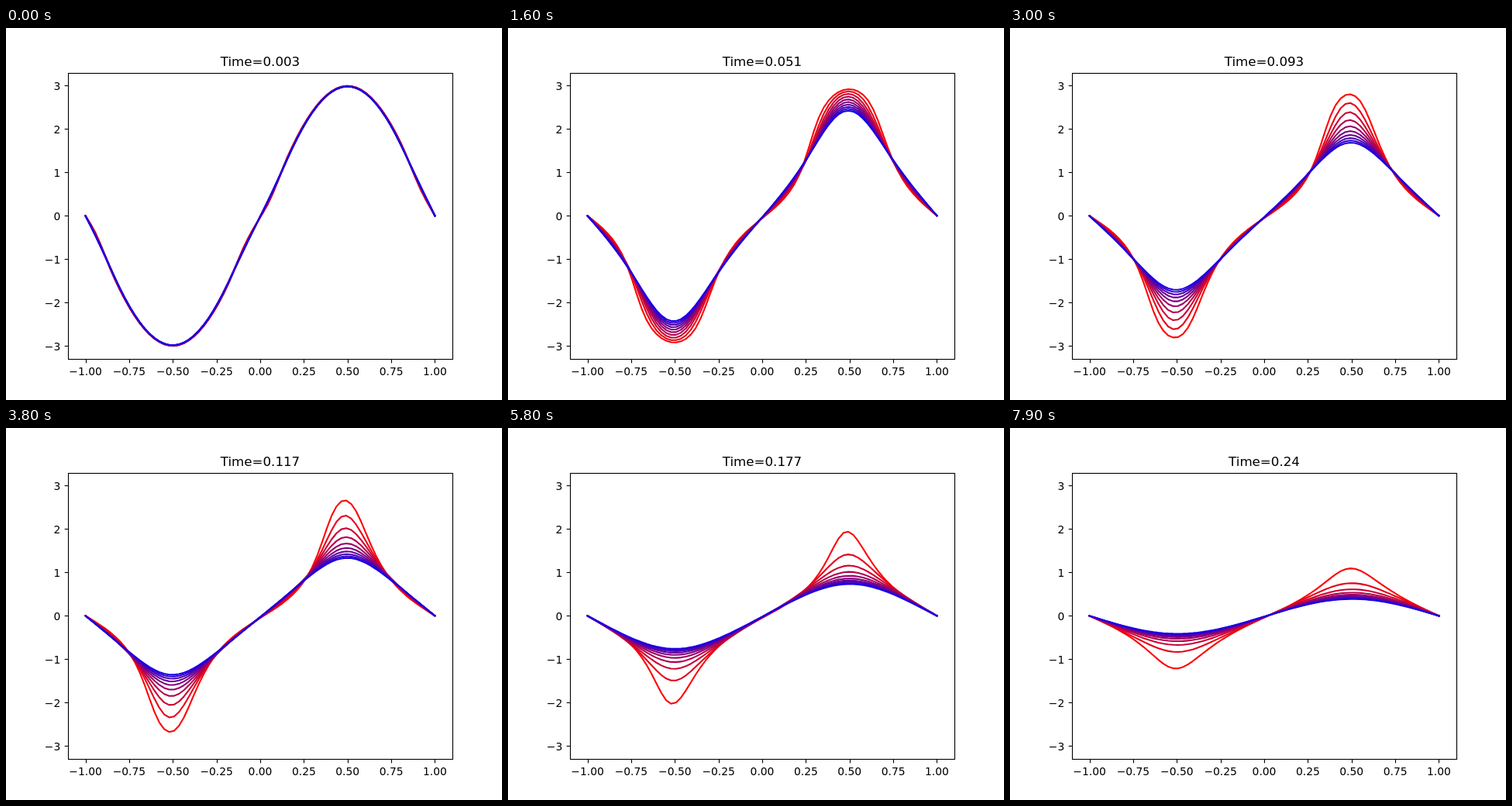
Animation, 640 px wide and 480 px high, one loop 8 s. Source, as an HTML page with a canvas:

```html
<!DOCTYPE html>
<html lang="en">
<head>
<meta charset="utf-8">
<title>Nonlinear diffusion</title>
<style>
  html, body { margin: 0; width: 100%; height: 100%; overflow: hidden; background: #fff; }
  canvas { display: block; }
</style>
</head>
<body>
<canvas id="plot" width="640" height="480"></canvas>
<script>
const ctx = document.getElementById('plot').getContext('2d');
const FRAMES = 80, FRAME_MS = 100, DT = 0.003;
const CURVES = 10, CELLS = 71, SUBSTEPS = 10;
const LEFT = 80, RIGHT = 576, TOP = 57.6, BOTTOM = 427.2;

const px = x => 328 + x * (RIGHT - LEFT) / 2.2;
const py = y => 242.4 - y * (BOTTOM - TOP) / 6.6;
const snap = v => Math.floor(v + 0.5) + 0.5;

// u_t = (D(u) u_x)_x with D = 1 / (1 + u^2 / s), u = 0 at both ends
function solve(s) {
  const h = 2 / CELLS, r = DT / SUBSTEPS / (h * h);
  const u = Array.from({ length: CELLS + 1 }, (_, i) => 3 * Math.sin(Math.PI * (i * h - 1)));
  u[0] = u[CELLS] = 0;
  const flux = new Float64Array(CELLS);
  const states = [];
  for (let n = 0; n < FRAMES; n++) {
    for (let k = 0; k < SUBSTEPS; k++) {
      for (let i = 0; i < CELLS; i++) {
        flux[i] = (u[i + 1] - u[i]) / (1 + u[i + 1] ** 2 / s);
      }
      for (let i = 1; i < CELLS; i++) u[i] += r * (flux[i] - flux[i - 1]);
    }
    states.push(u.slice());
  }
  return states;
}

const curves = Array.from({ length: CURVES }, (_, i) => ({
  color: `rgb(${Math.round(255 - 25.5 * i)},0,${Math.round(25.5 * i)})`,
  states: solve(0.46 + 0.24 * i)
}));

function line(x1, y1, x2, y2) {
  ctx.beginPath();
  ctx.moveTo(x1, y1);
  ctx.lineTo(x2, y2);
  ctx.stroke();
}

function label(text, x, y, align, size) {
  ctx.font = `${size}px "DejaVu Sans", sans-serif`;
  ctx.textAlign = align;
  ctx.fillText(text, x, y);
}

const signed = (v, digits) => (v < 0 ? '\u2212' : '') + Math.abs(v).toFixed(digits);

function drawAxes() {
  ctx.strokeStyle = ctx.fillStyle = '#000';
  ctx.lineWidth = 1.11;
  ctx.lineCap = 'butt';
  ctx.lineJoin = 'miter';
  const l = snap(LEFT), t = snap(TOP), b = snap(BOTTOM);
  ctx.strokeRect(l, t, snap(RIGHT) - l, b - t);
  for (let i = -4; i <= 4; i++) {
    const x = px(i / 4);
    line(snap(x), b, snap(x), b + 4.86);
    label(signed(i / 4, 2), x, 448, 'center', 13.89);
  }
  for (let v = -3; v <= 3; v++) {
    const y = py(v);
    line(l, snap(y), l - 4.86, snap(y));
    label(signed(v, 0), 70.3, Math.round(y + 5.3), 'right', 13.89);
  }
}

function drawCurve({ color, states }, n) {
  ctx.strokeStyle = color;
  ctx.lineWidth = 2.083;
  ctx.lineCap = 'square';
  ctx.lineJoin = 'round';
  ctx.beginPath();
  states[n].forEach((u, i) => ctx.lineTo(px(2 * i / CELLS - 1), py(u)));
  ctx.stroke();
}

function draw() {
  const n = Math.floor(performance.now() / FRAME_MS) % FRAMES;
  ctx.fillStyle = '#fff';
  ctx.fillRect(0, 0, 640, 480);
  curves.forEach(c => drawCurve(c, n));
  drawAxes();
  label('Time=' + Number(((n + 1) * DT).toFixed(3)), 328, 49, 'center', 16.67);
  requestAnimationFrame(draw);
}
draw();
</script>
</body>
</html>
```
